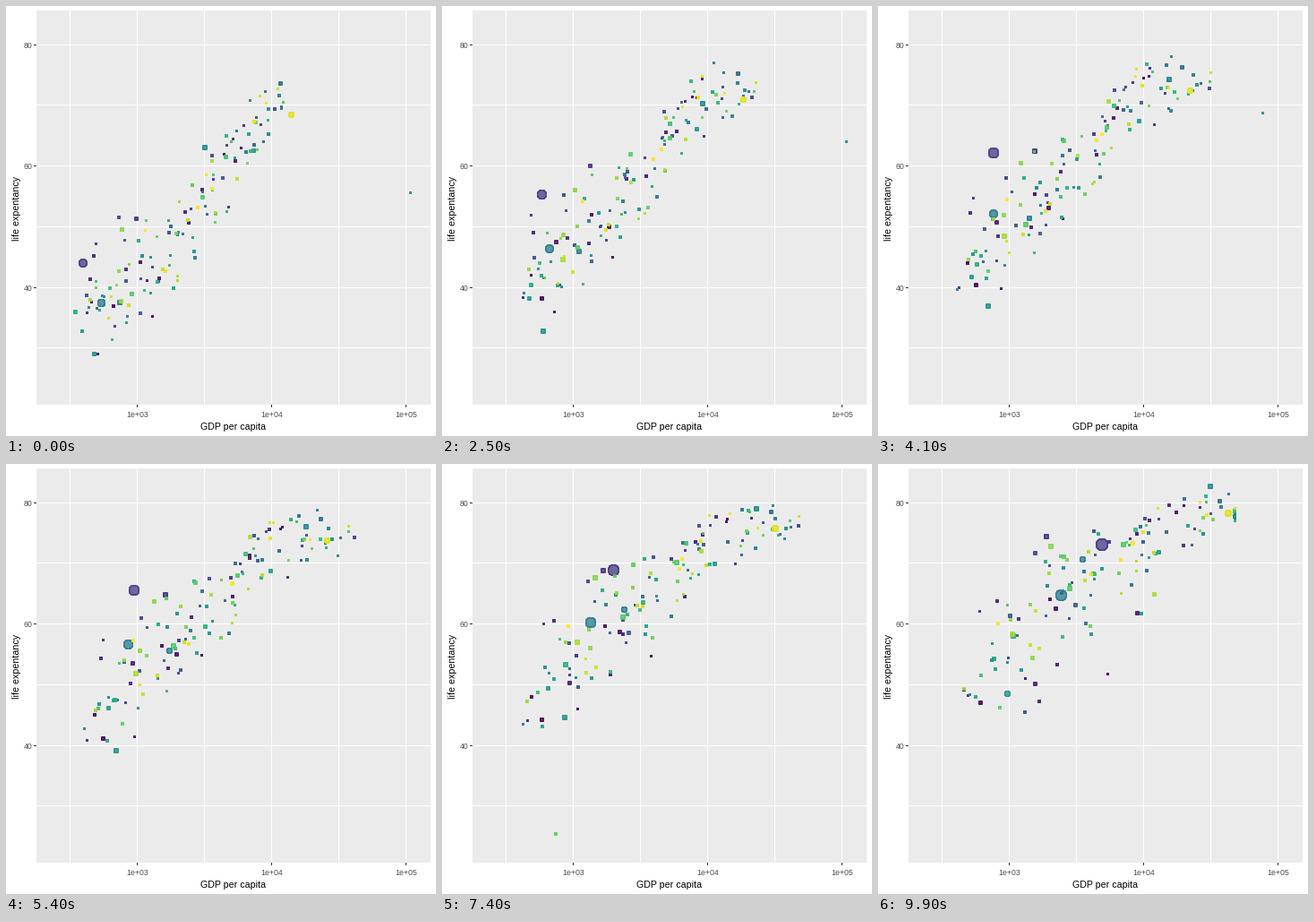
These frames come from a looping animation (480 px wide and 480 px high, 10000 ms). A matplotlib script:

```python
import matplotlib.pyplot as plt
import numpy as np
from matplotlib.animation import FuncAnimation
from matplotlib.patches import Rectangle

SIZE, DPI = 480, 72
FRAMES, INTERVAL = 100, 100
COUNT = 142
YEARS = np.arange(1952, 2008, 5)
STEP = (FRAMES - 1) / (len(YEARS) - 1)
MAX_POP = 1319
LEFT, TOP, SIDE = 34, 5, 440
RIGHT, BOTTOM = LEFT + SIDE, TOP + SIDE

plt.rcParams["font.family"] = "Liberation Sans"

# colour rank: population in millions (first, last), then (year, gdp, life) points
LEADS = {
    25: (556, 1319, [(1952, 400, 44), (1962, 488, 44.5), (1967, 613, 58.4),
                     (1982, 962, 65.5), (2007, 4959, 73)]),
    59: (372, 1110, [(1952, 547, 37.4), (1982, 856, 56.6), (2007, 2452, 64.7)]),
    60: (82, 224, [(1952, 750, 37.5), (2007, 3541, 70.7)]),
    67: (86, 127, [(1952, 3217, 63), (1972, 14779, 73.4), (2007, 31656, 82.6)]),
    72: (0.2, 2.5, [(1952, 108382, 55.6), (1972, 109348, 67.7),
                    (1982, 31354, 71.3), (2007, 47307, 77.6)]),
    108: (2.5, 8.9, [(1952, 493, 40), (1987, 848, 44), (1992, 737, 23.6),
                     (2007, 863, 46.2)]),
    135: (158, 301, [(1952, 13990, 68.4), (2007, 42952, 78.2)]),
}


def lead_track(first, last, points):
    years, gdp, life = np.array(points).T
    return (np.interp(YEARS, years, np.log10(gdp)),
            np.interp(YEARS, years, life),
            np.linspace(first, last, len(YEARS)))


def crowd_track(level, rng):
    """Life follows income on a curve that rises and flattens over the years."""
    n = len(YEARS)
    t = np.linspace(0, 1, n) ** 0.8
    gain = 0.08 + 0.52 * level + rng.normal(0, 0.18)
    drift = np.cumsum(rng.normal(0, 0.025, n))
    gdp_log = np.clip(2.58 + 1.5 * level + gain * t + drift, 2.45, 4.68)

    x = gdp_log - 2.5
    early = np.minimum(35 + 9.5 * x + 9.5 * x ** 2, 70.5)
    late = 84 - 42 * np.exp(-0.95 * x)
    spread = np.maximum(1.3, 6.2 - 2.3 * x)
    offset = np.clip(rng.normal(), -2, 2) + np.cumsum(rng.normal(0, 0.12, n))
    life = early + (late - early) * t + spread * offset
    if rng.random() < 0.16 and x[-1] < 1.7:
        life -= 15 * rng.random() * np.clip((YEARS - 1987) / 15, 0, 1)

    pop = np.clip(rng.lognormal(1.5, 1.25), 0.2, 58)
    growth = 3 - 1.7 * level
    return gdp_log, np.clip(life, 29, 82), pop * np.linspace(1, growth, n)


def build_tracks():
    rng = np.random.default_rng(1952)
    levels = iter(rng.permutation(np.linspace(0, 1, COUNT - len(LEADS))))
    return np.array([lead_track(*LEADS[rank]) if rank in LEADS
                     else crowd_track(next(levels), rng)
                     for rank in range(1, COUNT + 1)])


def px(gdp_log):
    return 146.3 + 150 * (gdp_log - 3)


def py(life):
    return 43.1 + 6.775 * (80 - life)


def diameters(pop):
    """Dot diameters in whole pixels, area proportional to population."""
    size = 1 + 5 * np.sqrt(np.clip(pop / MAX_POP, 0, 1))
    return np.floor(0.75 * (size * 2.845 + 0.945) + 0.5)


def line(xs, ys, color):
    ax.plot(xs, ys, color=color, lw=1, solid_capstyle="butt", snap=False, zorder=1)


def grid_x(value):
    x = np.floor(px(value)) + 0.5
    line([x, x], [TOP, BOTTOM], "white")
    return x


def grid_y(value):
    y = np.floor(py(value)) + 0.5
    line([LEFT, RIGHT], [y, y], "white")
    return y


fig = plt.figure(figsize=(SIZE / DPI, SIZE / DPI), dpi=DPI, facecolor="white")
ax = fig.add_axes([0, 0, 1, 1])
ax.set(xlim=(0, SIZE), ylim=(SIZE, 0))
ax.axis("off")
ax.add_patch(Rectangle((LEFT, TOP), SIDE, SIDE, color="#EBEBEB", lw=0, zorder=0))

for value in (2.5, 3.5, 4.5):
    grid_x(value)
for value in (30, 50, 70):
    grid_y(value)

tick_text = dict(color="#4D4D4D", fontsize=8.8, va="baseline")
for value in (3, 4, 5):
    x = grid_x(value)
    line([x, x], [BOTTOM, BOTTOM + 3], "#333333")
    ax.text(x, 459, f"1e+0{value}", ha="center", **tick_text)
for value in (40, 60, 80):
    y = grid_y(value)
    line([LEFT - 3, LEFT], [y, y], "#333333")
    ax.text(29.5, y + 3.5, str(value), ha="right", **tick_text)

label = dict(fontsize=10.6, color="black")
ax.text(254, 473, "GDP per capita", ha="center", va="baseline", **label)
ax.text(17, 226, "life expentancy", rotation=90, ha="right", va="center", **label)

data = build_tracks()
colors = plt.get_cmap("viridis")(np.linspace(0, 1, COUNT), alpha=0.75)
dots = ax.scatter(np.zeros(COUNT), np.zeros(COUNT), facecolors=colors,
                  edgecolors=colors, linewidths=0.9, antialiaseds=False, zorder=3)


def update(frame):
    step = min(int(frame // STEP), len(YEARS) - 2)
    part = frame / STEP - step
    gdp_log, life, pop = ((1 - part) * data[:, :, step] + part * data[:, :, step + 1]).T
    width = diameters(pop)
    centre = np.floor([px(gdp_log), py(life)]) + (width % 2) / 2
    dots.set_offsets(centre.T)
    dots.set_sizes((width - 1) ** 2)
    return (dots,)


anim = FuncAnimation(fig, update, frames=FRAMES, interval=INTERVAL,
                     repeat=True, repeat_delay=0, blit=False)
plt.show()
```
